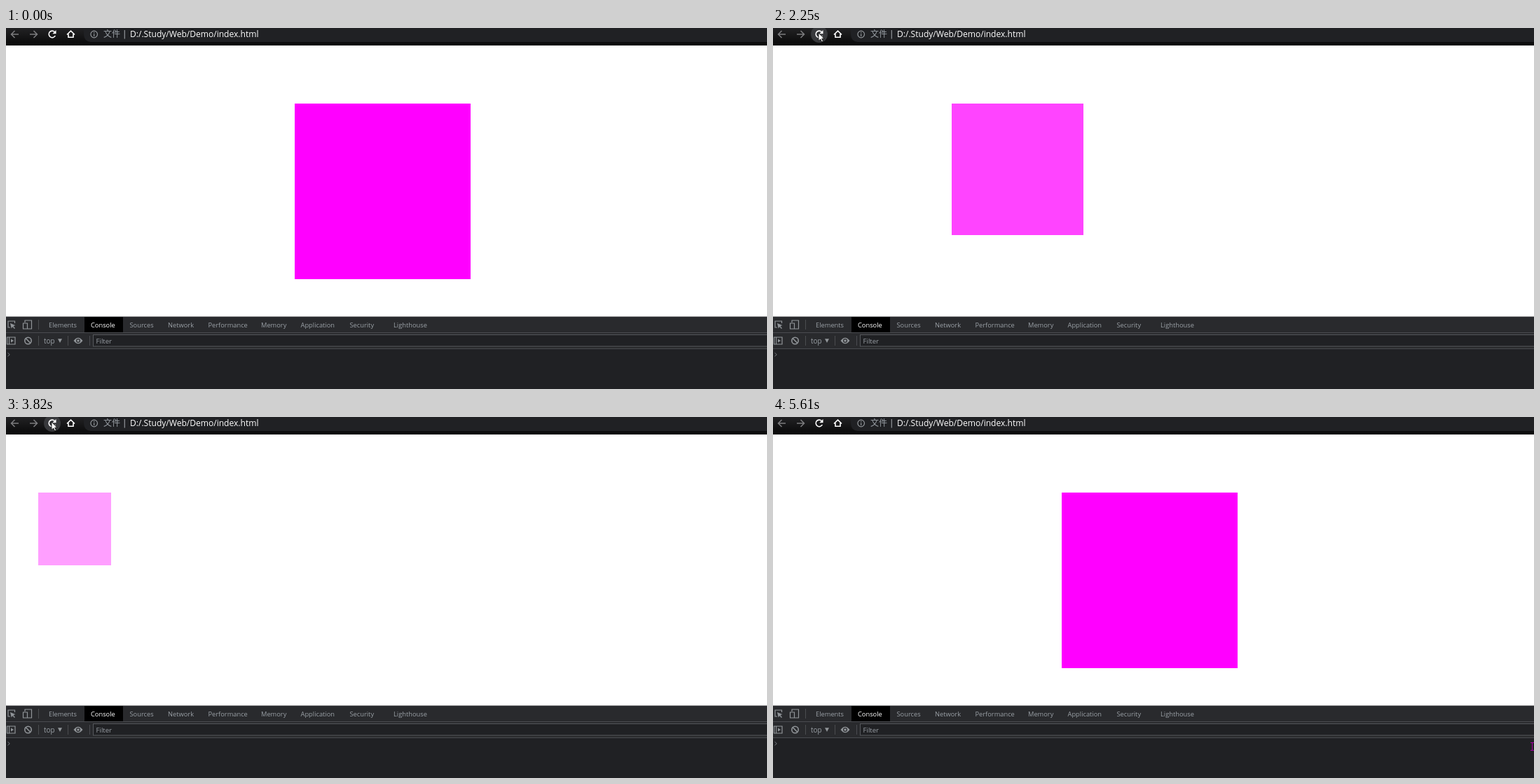
These frames come from a looping animation (1086 by 516 pixels, 6010 ms). An HTML page:

```html
<!DOCTYPE html>
<html lang="en">
<head>
<meta charset="utf-8">
<title>Moving square</title>
<style>
  html, body { margin: 0; width: 100%; height: 100%; overflow: hidden; background: #fff; }
  svg { display: block; width: 1086px; height: 516px; }
  text { font-family: "Open Sans", "Noto Sans", sans-serif; font-size: 9.3px; fill: #9aa0a6; white-space: pre; }
  .line { fill: none; stroke: #919599; stroke-width: 1.2; }
  .sep { stroke: #4a4c50; }
</style>
</head>
<body>
<svg viewBox="0 0 1086 516">
  <defs>
    <linearGradient id="chrome" x2="0" y2="1">
      <stop offset="0" stop-color="#222224"/>
      <stop offset="1" stop-color="#080808"/>
    </linearGradient>
  </defs>

  <rect width="1086" height="516" fill="#fff"/>
  <rect id="square" y="108" fill="#f0f"/>

  <!-- Browser toolbar -->
  <rect width="1086" height="25" fill="url(#chrome)"/>
  <path d="M1086 20H121Q111 19 111 9V0H1086Z" fill="#202124"/>
  <circle id="hover" cx="66" cy="9" r="12" fill="#38393c"/>
  <g class="line" stroke-width="1.5">
    <path d="M18 9H7.500M12.500 4L7.500 9L12.500 14M34 9H44.500M39.500 4L44.500 9L39.500 14" style="stroke:#7c7c7e;stroke-width:1.5"/>
    <path d="M70.300 11A4.800 4.800 0 1 1 69.400 5.500" style="stroke:#fff;stroke-width:1.6"/>
    <path d="M71.500 3V8.200H66.300Z" style="fill:#fff;stroke:none"/>
    <path d="M87 9.500L92.500 4.200L98 9.500M89 8.500V13.300H96V8.500" style="stroke:#fff;stroke-width:1.6"/>
    <circle cx="125.700" cy="9" r="4.800"/>
    <path d="M125.700 8.300V12M125.700 5.800V7.200"/>
    <path d="M169.300 3V15.500"/>
  </g>
  <text x="139" y="13.300" style="font:12px 'Noto Sans CJK SC','Noto Sans CJK',sans-serif">文件</text>
  <text x="177" y="13.300" style="font-size:12.050px;fill:#fff">D:/.Study/Web/Demo/index.html</text>

  <!-- Developer tools -->
  <rect y="412.500" width="1086" height="46" fill="#292a2d"/>
  <rect y="458" width="1086" height="58" fill="#202124"/>
  <rect x="112" y="413" width="55" height="22" fill="#000"/>
  <path class="sep" d="M0 435.500H1086M0 458.500H1086M46.500 417V431M46.500 440V454M88.500 440V454M119.500 440V454"/>
  <rect x="124.500" y="438.500" width="970" height="16.500" fill="#202124" stroke="#56585c"/>
  <g class="line">
    <path d="M6 428H3V419H12.500V422"/>
    <path d="M6 422L13.500 425L10.500 426L13 429.200L11.800 430L9.500 427L7.800 429.500Z" style="fill:#919599;stroke:none"/>
    <path d="M27 421V418H36.500V430H31M24.500 422H30.500V430H24.500Z"/>
    <path d="M1.500 442H13V452H1.500ZM4.500 442V452"/>
    <path d="M7 444.500L11 447L7 449.500Z" style="fill:#919599;stroke:none"/>
    <circle cx="31.500" cy="447" r="4.700" style="stroke-width:1.6"/>
    <path d="M28.300 443.800L34.700 450.200" style="stroke-width:1.6"/>
    <path d="M74 444.200H80L77 450Z" style="fill:#919599;stroke:none"/>
    <path d="M96.500 447Q103 438.500 109.500 447Q103 455.500 96.500 447Z" style="fill:#919599;stroke:none"/>
    <circle cx="103" cy="447" r="2.400" style="stroke:#292a2d;fill:#919599"/>
    <path d="M2.500 464.300L5.300 466.800L2.500 469.300" style="stroke:#777b80;stroke-width:1"/>
  </g>
  <g id="tabs"></g>
  <text x="54" y="450.700" style="font-size:9.900px">top</text>
  <text x="128.500" y="451" style="font-size:9.600px">Filter</text>

  <path id="arrow" d="M0 0V11.500L2.700 9L4.600 13L6.500 12.100L4.700 8.300H8Z" fill="#fff" stroke="#000" stroke-width=".8"/>
  <path id="beam" d="M1081 465.500H1086M1083.500 465.500V476.500M1081 476.500H1086" fill="none" stroke="#a000a0"/>
</svg>
<script>
  const LOOP = 6010;
  const UNITS = 60;
  const $ = id => document.getElementById(id);

  const tabs = { Elements: 61, Console: 121, Sources: 176.5, Network: 231, Performance: 288.5,
    Memory: 364, Application: 420.5, Security: 490.5, Lighthouse: 553 };
  $('tabs').innerHTML = Object.entries(tabs).map(([name, x]) =>
    `<text x="${x}" y="427.700"${name === 'Console' ? ' style="fill:#fff"' : ''}>${name}</text>`).join('');

  // Each key is [time, ...values]; the page reloads at 930 and 3470 ms.
  const progressKeys = [[0, 60], [929, 60], [930, 16], [1280, 25], [1480, 30], [1900, 38], [2250, 45],
    [2530, 50], [3070, 60], [3469, 60], [3470, 16], [3820, 25], [4020, 29], [4650, 41], [5610, 60]];
  const cursorKeys = [[70, 741, 346], [270, 330, 150], [470, 110, 30], [600, 48, 6], [730, 65, 7],
    [5000, 65, 7], [5130, 430, 150], [5270, 1033, 406]];

  function sample(keys, t) {
    const next = keys.findIndex(key => key[0] > t);
    if (next < 0) return keys.at(-1).slice(1);
    if (next === 0) return keys[0].slice(1);
    const a = keys[next - 1], b = keys[next];
    const k = (t - a[0]) / (b[0] - a[0]);
    return a.slice(1).map((v, i) => v + (b[i + 1] - v) * k);
  }

  const show = (id, visible) => $(id).setAttribute('visibility', visible ? 'visible' : 'hidden');
  const ramp = (t, start, length) => Math.min(1, Math.max(0, (t - start) / length));

  function draw(t) {
    const q = Math.floor(sample(progressKeys, t)[0] + 0.01) / UNITS;
    const size = 250.6 * q;
    const square = $('square');
    square.setAttribute('x', Math.round(411.9 - 628 * (1 - q)));
    square.setAttribute('width', Math.round(size));
    square.setAttribute('height', Math.round(size));
    square.setAttribute('opacity', 1 - (1 - q) * 16 / 15);

    const [x, y] = sample(cursorKeys, t);
    $('arrow').setAttribute('transform', `translate(${x} ${y})`);
    show('arrow', t >= 70 && t < 5340);
    show('beam', t >= 5340);
    $('hover').setAttribute('opacity', ramp(t, 540, 150) - ramp(t, 5060, 300));
  }

  function frame() {
    draw(performance.now() % LOOP);
    requestAnimationFrame(frame);
  }
  frame();
</script>
</body>
</html>
```
